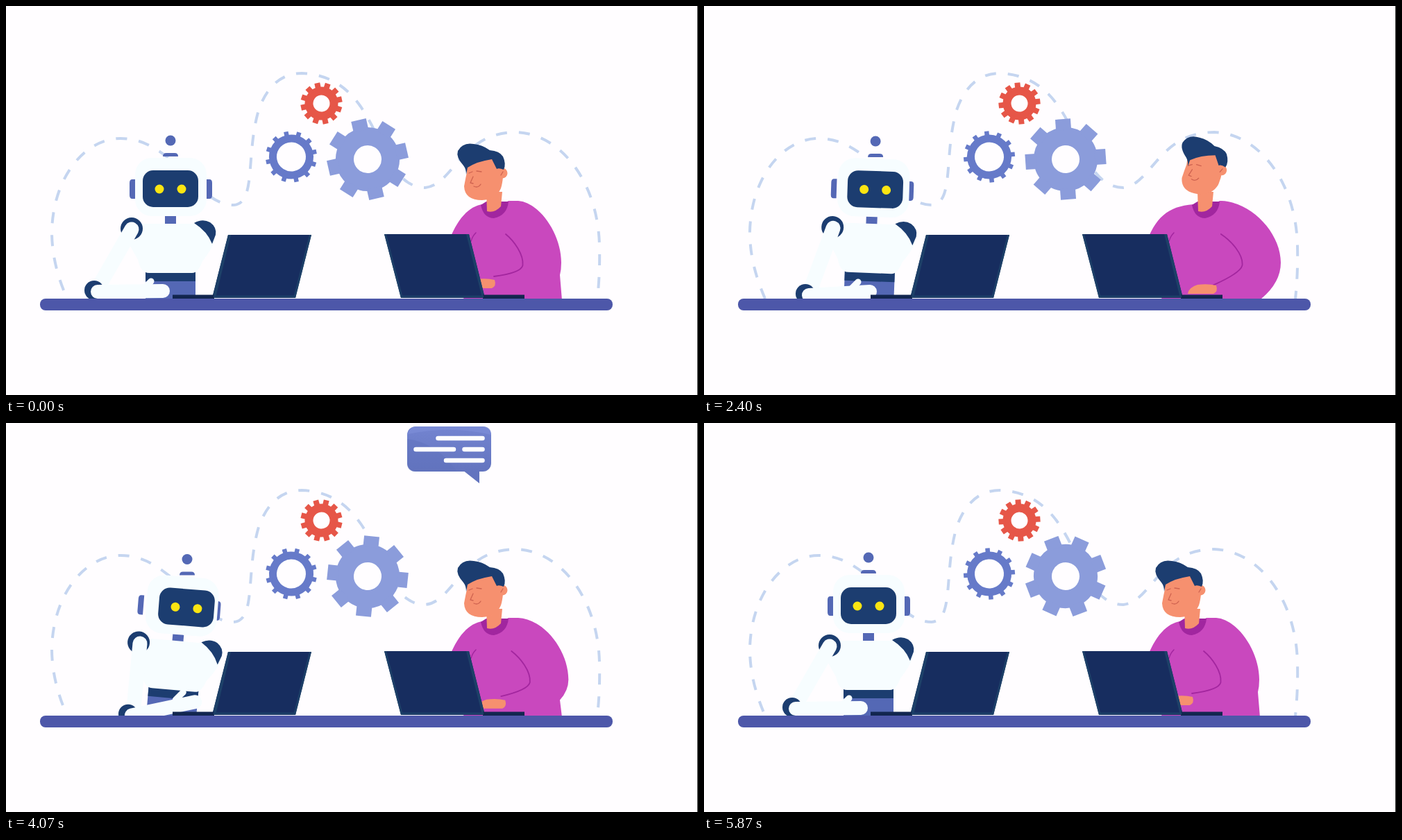
Recreate the animation shown at these times as an HTML page. Size 997 px wide and 561 px high, loop 5.94 s.

```html
<!DOCTYPE html>
<html lang="en">
<head>
<meta charset="utf-8">
<title>Robot and person at work</title>
<style>
  html, body { margin: 0; width: 100%; height: 100%; overflow: hidden; background: #fffdff; }
  svg { display: block; width: 100vw; height: 100vh; }
  .round { fill: none; stroke-linecap: round; stroke-linejoin: round; }
  .shell { fill: #f7fdff; }
  .limb { stroke: #f7fdff; }
  .navy { fill: #1c3d70; }
  .blue { fill: #5468b5; }
  .skin { fill: #f6906f; }
</style>
</head>
<body>
<svg viewBox="0 0 997 561">
  <defs>
    <linearGradient id="bubbleFill" x1="0" y1="0" x2="0" y2="1">
      <stop offset="0" stop-color="#7384d0"/>
      <stop offset="1" stop-color="#6374bf"/>
    </linearGradient>
    <g id="bubble">
      <path d="M658 63L682 82V60Z" fill="#6374bf"/>
      <rect x="578" width="121" height="65" rx="12" fill="url(#bubbleFill)"/>
      <path d="M579 11Q582 0 592 0H687Q699 0 699 12Q640 -2 579 11Z" fill="#7f90da" opacity=".6"/>
      <path d="M578 18Q620 23 650 65H590Q578 65 578 53Z" fill="#6072be" opacity=".5"/>
      <path d="M622.500 17H686.500M590.500 33H645M660.500 33H686.500M634 49H686.500" class="round" stroke="#fff" stroke-width="6.500"/>
    </g>
  </defs>

  <path id="trail" fill="none" stroke="#c5d5f0" stroke-width="4"
    d="M88 422C72 385 66 355 66 325C68 245 115 191 165 191C200 191 222 210 240 224C270 252 295 287 328 287C361 285 345 215 364 150C378 110 402 97 426 97C485 99 510 140 527 172C548 215 565 262 604 262C645 258 655 182 735 182C800 184 853 255 855 345Q856 385 852 422"/>
  <g id="gears"></g>

  <g id="robot">
    <g id="antenna">
      <circle cx="237" cy="194" r="7.500" class="blue"/>
      <path d="M226 217Q226 212 231 212H243Q248 212 248 217Z" class="blue"/>
    </g>
    <g id="torso">
      <rect x="229" y="302" width="16" height="16" class="blue"/>
      <path d="M201 380H273V430H201Z" class="blue"/>
      <path d="M201 380H273V397H201Z" class="navy"/>
      <path d="M183 314H285Q301 318 301 338Q296 352 283 368Q277 385 268 385H206Q194 385 190 366L170 330Z" class="shell"/>
      <path d="M271 313Q283 306 294 312Q304 319 302 330L297 343Q290 325 271 313Z" class="navy"/>
      <circle cx="181" cy="321" r="16" class="navy"/>
    </g>
    <g id="ears" class="blue">
      <path d="M186 250V278H182Q178 278 178 273V255Q178 250 182 250Z"/>
      <path d="M289 250V278H293Q297 278 297 273V255Q297 250 293 250Z"/>
    </g>
    <rect id="skull" x="186" y="219" width="103" height="84" rx="24" class="shell"/>
    <g id="visor">
      <rect x="197" y="237" width="80" height="53" rx="15" class="navy"/>
      <circle cx="221" cy="264" r="6.500" fill="#fbe512"/>
      <circle cx="253" cy="264" r="6.500" fill="#fbe512"/>
    </g>
    <path id="upperArm" class="round limb" stroke-width="21"/>
    <circle id="elbow" r="14" class="navy"/>
    <path id="forearm" class="round limb" stroke-width="20"/>
    <path id="thumb" class="round limb" stroke-width="9"/>
  </g>

  <g id="person">
    <path id="sweater" fill="#c948be"/>
    <path id="crease" class="round" stroke="#a3269f" stroke-width="1.800"/>
    <path d="M677 327Q672 332 670 339" class="round" stroke="#a3269f" stroke-width="1.500"/>
    <g id="neck">
      <path d="M684 287L692 282H719L724 282Q722 302 703 306Q688 306 684 287Z" fill="#a1269f"/>
      <path d="M692 268H715L713 289Q704 299 693 296Z" class="skin"/>
    </g>
    <g id="face">
      <circle cx="715" cy="241" r="7.500" class="skin"/>
      <path d="M664 225L716 218Q718 247 713 263Q706 279 686 280Q661 280 660 260Q662 249 664 240Z" class="skin"/>
      <path id="hair" d="M663 243Q663 235 659 230Q648 218 651 209Q658 196 674 199Q686 200 697 208Q711 209 716 217Q721 228 717 236Q710 233 707 235L700 221Q679 224 665 233Z" class="navy"/>
      <path d="M667 241L672 239M678 238L685 239M673 246L669 255L673 256M674 260Q680 263 684 257M716 239L713 244" class="round" stroke="#cf6350" stroke-width="1.300"/>
    </g>
    <path id="hand" class="skin"/>
  </g>

  <g id="laptops">
    <path d="M320 330H440L417 421H297Z" fill="#172d5f"/>
    <path d="M320 330H324L302 421H297ZM440 330H437L414 421H417Z" fill="#1d4068"/>
    <rect x="240" y="416.500" width="60" height="6" fill="#12264f"/>
    <path d="M545 329H667L690 421H569Z" fill="#172d5f"/>
    <path d="M667 329H663L686 421H690ZM545 329H548L572 421H569Z" fill="#1d4068"/>
    <rect x="687" y="416.500" width="60" height="6" fill="#12264f"/>
    <path d="M299 419H417M569 419H688" stroke="#1d4068" stroke-width="3"/>
  </g>
  <rect x="49" y="422" width="825" height="17" rx="8" fill="#4d57a9"/>

  <use id="rightBubble" href="#bubble"/>
  <use id="leftBubble" href="#bubble"/>
  <rect x="996" width="1" height="561" fill="#222"/>
</svg>

<script>
const LOOP = 5940, STEP = 200 / 3, CYCLE = 46.7;
const DASH_PITCH = 33, DASH = 16;
const $ = id => document.getElementById(id);
const set = (id, name, value) => $(id).setAttribute(name, value);
const move = (id, value) => set(id, 'transform', value);
const clamp = x => Math.max(0, Math.min(1, x));
const smooth = x => (1 - Math.cos(Math.PI * clamp(x))) / 2;

// Rises over a..b, stays, and falls over c..d.
const pulse = (p, a, b, c, d) => smooth((p - a) / (b - a)) - smooth((p - c) / (d - c));

function track(p, keys) {
  const next = keys.findIndex(k => k[0] > p);
  if (next < 1) return keys[next < 0 ? keys.length - 1 : 0].slice(1);
  const a = keys[next - 1], b = keys[next];
  const u = (p - a[0]) / (b[0] - a[0]);
  return a.slice(1).map((v, i) => v + (b[i + 1] - v) * u);
}

// Time, elbow x, elbow y, hand x, hand y
const ARM = [
  [0, 127, 410, 226, 411],
  [4.3, 157, 416, 254, 401],
  [10, 177, 420, 278, 394],
  [22, 174, 419, 262, 417],
  [25.3, 190, 420, 276, 396],
  [36, 146, 415, 239, 412],
  [41.3, 127, 410, 226, 411],
  [CYCLE, 127, 410, 226, 411]
];

const GEARS = [
  { x: 521, y: 221, teeth: 8, outer: 58, root: 46, hole: 20, width: 22, color: '#8b9cdb', start: -103, speed: 4 },
  { x: 454.5, y: 140.500, teeth: 12, outer: 30, root: 24, hole: 12, width: 8, color: '#e65648', start: -102, speed: -4 },
  { x: 411, y: 217.500, teeth: 12, outer: 37, root: 32, hole: 21, width: 6.500, color: '#667ac9', start: -102, speed: -4 }
];

$('gears').innerHTML = GEARS.map(g => {
  let teeth = '';
  for (let i = 0; i < g.teeth; i++)
    teeth += `<rect x="${g.root - 4}" y="${-g.width / 2}" width="${g.outer - g.root + 4}" height="${g.width}" transform="rotate(${i * 360 / g.teeth})"/>`;
  return `<g fill="${g.color}"><circle r="${(g.root + g.hole) / 2}" fill="none" stroke="${g.color}" stroke-width="${g.root - g.hole}"/>${teeth}</g>`;
}).join('');

const gearNodes = [...$('gears').children];
const trailLength = $('trail').getTotalLength();
set('trail', 'stroke-dasharray', `${DASH} ${DASH_PITCH - DASH}`);

function drawRobot(p) {
  const lean = pulse(p, 0, 8, 30.5, 40.5);
  const [ex, ey, hx, hy] = track(p, ARM);
  const tilt = dx => `translate(${dx * lean} ${2.5 * lean}) rotate(${4.5 * lean} 237 263.5)`;
  move('antenna', `translate(${24 * lean} ${2.5 * lean})`);
  move('torso', `translate(${3 * lean}) rotate(${5 * lean} 237 400)`);
  // The nearer parts of the head travel further, so it seems to turn.
  move('ears', tilt(12));
  move('skull', tilt(16));
  move('visor', tilt(23));
  set('upperArm', 'd', `M${181 + 12 * lean} ${322 - 4 * lean}L${ex + 8} ${ey - 8}`);
  set('elbow', 'cx', ex);
  set('elbow', 'cy', ey);
  set('forearm', 'd', `M${ex + 5} ${ey + 2}L${hx} ${hy}`);
  set('thumb', 'd', `M${hx - 28} ${hy - 3}L${hx - 17} ${hy - 14}`);
}

function drawPerson(p) {
  const back = pulse(p, 20, 26, 36, 41);
  const typing = pulse(p, 0, 10, 10, 20);
  const bulge = 31 * back + 17 * typing;
  const collar = 19 * back;
  const side = 800 + bulge, notch = 388 + 1.1 * bulge;
  set('sweater', 'd', `M636 345C650 305 668 289 ${686 + collar} 286L${705 + collar} 292L${724 + collar} 281
    H${738 + 0.4 * collar}C${768 + bulge * 0.7} 283 ${side} 328 ${side} 370
    Q${side} ${380 + bulge * 0.6} ${798 + 5 * back} ${notch}L801 424H660Z`);
  set('crease', 'd', `M${720 + 0.8 * bulge} 329C${732 + 0.9 * bulge} 339 ${746 + bulge} 358 ${744.5 + bulge} 374
    Q${742 + bulge} 385 ${703 + bulge} ${390 + 0.4 * bulge}`);
  move('neck', `translate(${collar})`);
  move('face', `translate(${28 * back} ${-8 * back}) rotate(${8 * back} 690 262)`);
  move('hair', `translate(${3 * back})`);
  const r = 704 + 34 * back + 25 * typing, y = 400 + 8 * Math.max(back, typing);
  set('hand', 'd', `M${r} ${y - 5}Q${r + 3} ${y + 4} ${r - 4} ${y + 7}H${r - 41}Q${r - 40} ${y - 2} ${r - 27} ${y - 6}Q${r - 12} ${y - 8} ${r} ${y - 5}Z`);
}

function drawBubble(id, y, appear, place) {
  move(id, place(y));
  set(id, 'opacity', clamp(appear) * clamp((y + 6) / 8));
}

function draw(time) {
  const n = Math.min(88, Math.floor((time % LOOP + 4) / STEP));
  const p = n % CYCLE;
  GEARS.forEach((g, i) => gearNodes[i].setAttribute('transform',
    `translate(${g.x} ${g.y}) rotate(${g.start + g.speed * n})`));
  const dashStart = trailLength - 32 + n * DASH_PITCH / 10;
  set('trail', 'stroke-dashoffset', -(dashStart % DASH_PITCH));
  drawRobot(p);
  drawPerson(p);
  drawBubble('rightBubble', 30 + 5.8 * (10 - p), p / 3, y => `translate(0 ${y})`);
  drawBubble('leftBubble', 73 - 7.6 * (p - 22), (p - 18) / 3, y => `translate(963 ${y}) scale(-1 1)`);
}

const begin = performance.now();
function tick() {
  draw(performance.now() - begin);
  requestAnimationFrame(tick);
}
tick();
</script>
</body>
</html>
```
